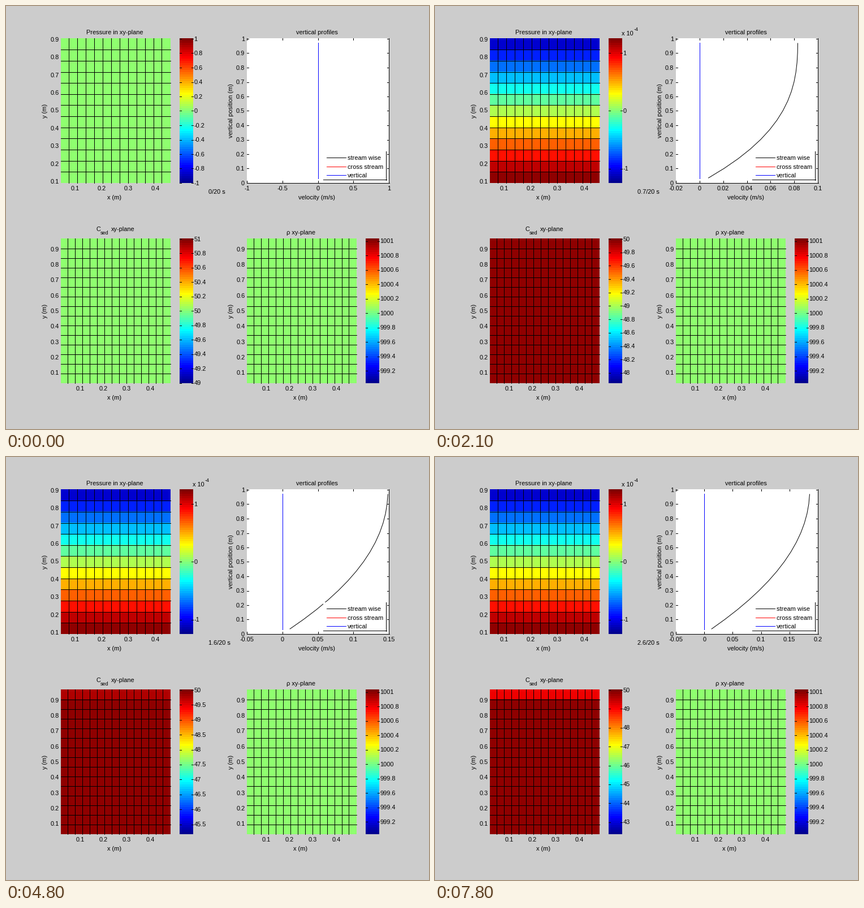
Animation of 748 by 748 pixels, one loop 8000 ms. Source, as a matplotlib script:

```python
import math

import matplotlib.pyplot as plt
import numpy as np
from matplotlib.animation import FuncAnimation
from matplotlib.patches import Rectangle

SIZE, DPI = 748, 88
PX = 72 / DPI  # one pixel in points
TICK_MS, TICKS, HOLD = 100, 80, 3

plt.rcParams.update({"font.family": "Liberation Sans", "font.size": 11 * PX})

fig = plt.figure(figsize=(SIZE / DPI, SIZE / DPI), dpi=DPI, facecolor="#cccccc")
ax = fig.add_axes([0, 0, 1, 1])
ax.set_xlim(0, SIZE)
ax.set_ylim(SIZE, 0)
ax.axis("off")

TOP, LOW, HEIGHT = 57, 411, 256
LEFT, RIGHT, WIDTH = 97, 426, 194
PLOT_W, PLOT_H = 251, 255


def jet(i):
    """Colour i (1 to 64) of the 64-step jet map."""
    i = np.asarray(i, float)
    ramps = [np.minimum(i - 24, 72 - i), np.minimum(i - 8, 56 - i), np.minimum(i + 8, 40 - i)]
    return np.clip(np.stack(ramps, -1) / 16, 0, 1)


def text(x, y, s, ha="center", size=11, turn=0, z=3):
    """Text whose capitals are centred on y (on x when turned)."""
    dx, dy = (4, 0) if turn else (0, 4)
    return ax.text(x + dx, y + dy, s, ha=ha, va="baseline", size=size * PX,
                   rotation=turn, rotation_mode="anchor", zorder=z)


# Line positions are pixel columns and rows; snapping moves them to pixel centres.
def vline(x, y0, y1, color="k", z=2):
    return ax.vlines(x, y0, y1, color=color, lw=PX, antialiased=False, zorder=z)


def hline(y, x0, x1, color="k", z=2):
    return ax.hlines(np.asarray(y) + 1, x0, x1, color=color, lw=PX, antialiased=False, zorder=z)


def image(x, y, w, h, levels):
    return ax.imshow(jet(levels)[:, None], extent=(x, x + w, y + h, y), aspect="auto",
                     interpolation="nearest", zorder=1)


def cells(x, y, n):
    """An n by n field with grid lines between its cells."""
    field = image(x, y, WIDTH, HEIGHT, np.full(n, 33))
    k = np.arange(1, n)
    vline(np.floor(x - 0.1 + WIDTH * k / n), y, y + HEIGHT)
    hline(np.floor(y + 0.2 + 255.2 * k / n), x, x + WIDTH)
    return field


def axis_labels(x, y, xticks, yticks):
    """xticks and yticks: pixel of 0.1, pixels per 0.1, count."""
    start, step, count = xticks
    for k in range(count):
        text(start + step * k, y + 265, f"{0.1 * (k + 1):.1f}")
    start, step, count = yticks
    for k in range(count):
        text(x - 3, start - step * k, f"{0.1 * (k + 1):.1f}", "right")
    text(x + 95, y + 281, "x (m)")
    text(x - 29, y + 128, "y (m)", turn=90)


def colorbar(x, y):
    image(x, y, 24, HEIGHT, np.arange(64, 0, -1))


def bar_ticks(x, y, lo, hi, values):
    made = []
    for v in values:
        py = y + (HEIGHT - 1) * (hi - v) / (hi - lo)
        row = round(py)
        made += [hline(row, x, x + 3), hline(row, x + 21, x + 24),
                 text(x + 25.5, py + 0.5, f"{round(v, 2) + 0:g}", "left")]
    return made


def steps(lo, hi, step):
    first, last = math.ceil(lo / step - 1e-6), math.floor(hi / step + 1e-6)
    return [k * step for k in range(first, last + 1)]


def nice_step(fits):
    """Smallest 1-2-5 step that fits."""
    sizes = (m * 10.0 ** e for e in range(-4, 2) for m in (1, 2, 5))
    return next(s for s in sizes if fits(s))


def power(x, y, exponent):
    return [text(x, y, "x 10", "left"), text(x + 21.5, y - 8.5, exponent, "left", 9)]


# Fields and colour bars
pressure = cells(LEFT, TOP, 13)
sediment = cells(LEFT, LOW, 15)
cells(RIGHT, LOW, 15)
colorbar(307, TOP)
colorbar(307, LOW)
colorbar(636, LOW)
bar_ticks(636, LOW, 999.03, 1001.03, steps(999.1, 1001.01, 0.2))
axis_labels(LEFT, TOP, (122, 47.3, 4), (310, 31.4, 9))
axis_labels(LEFT, LOW, (131, 41.3, 4), (648.5, 27.35, 9))
axis_labels(RIGHT, LOW, (460, 41.3, 4), (648.5, 27.35, 9))
text(192, 45.5, "Pressure in xy-plane")
text(160, 393.5, "C", "left")
text(167, 399.5, "sed", "left", 9)
text(186, 393.5, "xy-plane", "left")
text(522, 399.5, "ρ xy-plane")

# Velocity plot
ax.add_patch(Rectangle((RIGHT, TOP), PLOT_W + 1, PLOT_H + 1, fc="w", lw=0, zorder=1))
vline(RIGHT + PLOT_W, TOP, TOP + PLOT_H + 1)
hline(TOP + PLOT_H, RIGHT, RIGHT + PLOT_W + 1)
for k in range(11):
    y = TOP + PLOT_H * (1 - k / 10)
    hline(round(y), RIGHT, RIGHT + 3)
    hline(round(y), RIGHT + PLOT_W - 3, RIGHT + PLOT_W)
    text(RIGHT - 4, y + 0.5, f"{k / 10:g}", "right")
text(550, 45.5, "vertical profiles")
text(550, 338, "velocity (m/s)")
text(397, 185, "vertical position (m)", turn=90)

# Legend
ax.add_patch(Rectangle((561, 257), 113, 51, fc="w", lw=0, zorder=4))
vline(672, 257, 308, z=5)
hline(306, 561, 673, z=5)
for y, color, name in [(267, "k", "stream wise"), (283, "r", "cross stream"), (298, "b", "vertical")]:
    hline(y, 567, 601, color, z=5)
    text(604, y + 1, name, "left", z=6)

heights = (np.arange(15) + 0.5) / 15
stream, = ax.plot([], [], "k", lw=PX, zorder=2)
clock = text(358, 328, "", "left")
changing = []


def surface_speed(t):
    return 0.118 * t if t < 0.7 else 0.2199 - 0.227 * math.exp(-0.72 * t)


def profile(t):
    bend = ((2.25 / math.sqrt(t)) ** 8 + 2.04 ** 8) ** 0.125
    return surface_speed(t) * (1 - (1 - heights) ** bend) / (1 - (1 - heights[-1]) ** bend)


def velocity_axis(lo, hi, step):
    scale = PLOT_W / (hi - lo)
    small = step < 0.005
    for v in steps(lo, hi, step):
        x = RIGHT + (v - lo) * scale
        label = round(v * 1000 if small else v, 4) + 0
        changing.extend([vline(round(x), TOP, TOP + 3),
                         vline(round(x), TOP + PLOT_H - 3, TOP + PLOT_H),
                         text(x, 322, f"{label:g}")])
    if small:
        changing.extend(power(650, 342, "-3"))
    zero = RIGHT - lo * scale
    changing.append(vline(round(zero), 65, 305, "b", 3))
    return zero, scale


def update(i):
    t = i // HOLD / 10
    while changing:
        changing.pop().remove()
    clock.set_text(f"{t:g}/20 s")

    if t == 0:
        pressure.set_data(jet(np.full(13, 33))[:, None])
        sediment.set_data(jet(np.full(15, 33))[:, None])
        changing.extend(bar_ticks(307, TOP, -1, 1, steps(-1, 1, 0.2)))
        changing.extend(bar_ticks(307, LOW, 49, 51, steps(49, 51, 0.2)))
        velocity_axis(-1, 1, 0.5)
        stream.set_data([], [])
        return

    pressure.set_data(jet(np.minimum(5 * np.arange(1, 14), 63))[:, None])
    changing.extend(bar_ticks(307, TOP, -1.246, 1.246, [-1, 0, 1]))
    changing.extend(power(330, 48, "-4"))

    levels = np.full(15, 63)
    levels[0] -= round(max(0, t - 1.1) * 4)
    sediment.set_data(jet(levels)[:, None])
    span = -0.0295 + 3.18 * t - 0.089 * t * t
    step = nice_step(lambda s: span / s <= 11)
    changing.extend(bar_ticks(307, LOW, 50 - span, 50, steps(50 - span, 50, step)))

    speed = profile(t)
    step = nice_step(lambda s: math.ceil(speed[-1] / s) <= 6)
    zero, scale = velocity_axis(-step, math.ceil(speed[-1] / step) * step, step)
    stream.set_data(zero + scale * speed + 0.5, TOP + PLOT_H * (1 - heights) + 0.5)


anim = FuncAnimation(fig, update, frames=TICKS, interval=TICK_MS, init_func=lambda: update(0),
                     repeat=True, repeat_delay=0, blit=False)
plt.show()
```
